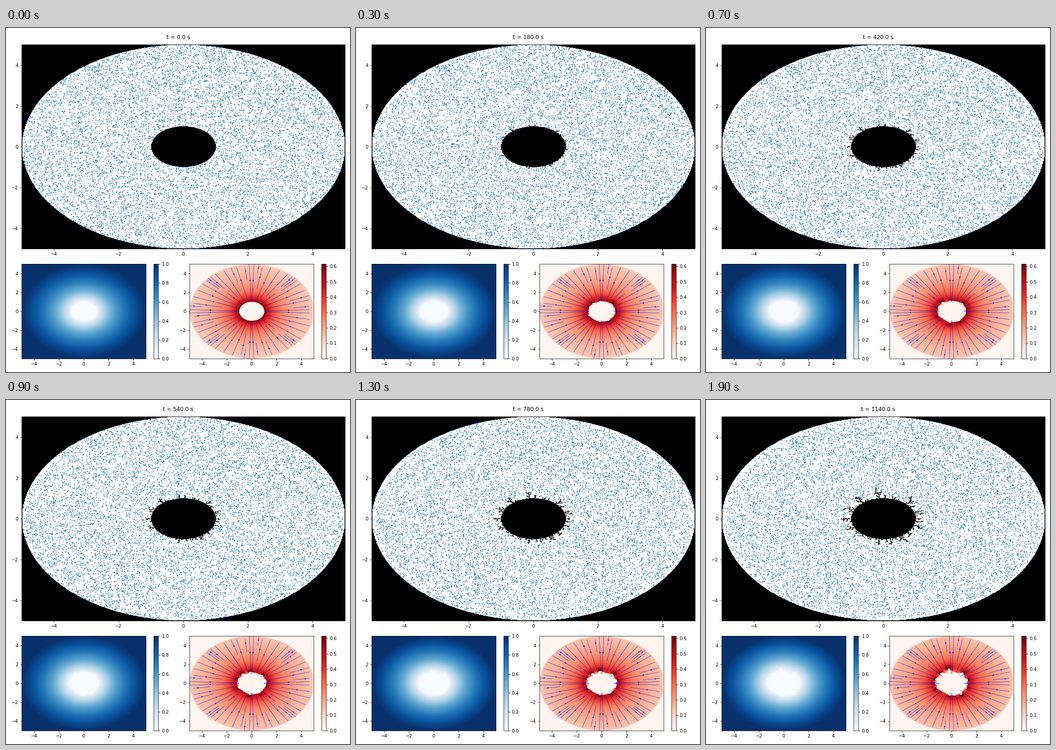
Write a matplotlib script that moves like this. It is 748 px wide and 748 px high and loops after 2 s.

```python
import numpy as np
import matplotlib.pyplot as plt
from matplotlib.animation import FuncAnimation

SIZE, DPI = 748, 72
FRAMES, INTERVAL = 20, 100
STEP_S = 60            # simulated seconds per frame
N = 400                # grid cells per side
IONS = 11500
R_IN, R_OUT = 1.0, 5.0
MOBILITY = 6.4e-4
SUBSTEPS = 12
JITTER = 0.024 / np.sqrt(SUBSTEPS)
E_MAX = 0.615
EXTENT = (-5, 5, -5, 5)

rng = np.random.default_rng(4)
axis = np.linspace(-5, 5, N)
h = axis[1] - axis[0]
X, Y = np.meshgrid(axis, axis)
R = np.hypot(X, Y)
outer = R >= R_OUT
parity = np.add.outer(np.arange(N), np.arange(N)) % 2 == 0


def grow(mask, diagonal=False):
    """Dilate a mask by one cell."""
    rows = mask.copy()
    rows[1:] |= mask[:-1]
    rows[:-1] |= mask[1:]
    base = rows if diagonal else mask
    out = rows.copy()
    out[:, 1:] |= base[:, :-1]
    out[:, :-1] |= base[:, 1:]
    return out


def relax(phi, free, rounds=70, omega=1.94):
    """Red-black over-relaxation of Laplace's equation."""
    core = phi[1:-1, 1:-1]
    weights = [omega * (free & p)[1:-1, 1:-1] for p in (parity, ~parity)]
    for _ in range(rounds):
        for w in weights:
            mean = 0.25 * (phi[2:, 1:-1] + phi[:-2, 1:-1]
                           + phi[1:-1, 2:] + phi[1:-1, :-2])
            core += w * (mean - core)


def field(phi):
    gy, gx = np.gradient(phi, h)
    return -gx, -gy


def strength(ex, ey, blocked):
    e = np.hypot(ex, ey)
    e[blocked | outer | (X > 4.9)] = 0
    return e


def cells(pos):
    idx = np.rint((pos + 5) / h).astype(int).clip(0, N - 1)
    return idx[:, 1], idx[:, 0]


def move(pos, solid, ex, ey):
    """Drift and diffuse the ions; those touching the electrode stick."""
    dt = STEP_S / SUBSTEPS
    for _ in range(SUBSTEPS):
        at = cells(pos)
        drift = MOBILITY * dt * np.column_stack((ex[at], ey[at]))
        new = pos + drift + rng.normal(0, JITTER, pos.shape)
        inside = np.hypot(new[:, 0], new[:, 1]) < R_OUT - 0.01
        pos = np.where(inside[:, None], new, pos)
        iy, ix = cells(pos)
        stuck = grow(solid)[iy, ix]
        solid[iy[stuck], ix[stuck]] = True
        pos = pos[~stuck]
    return pos


def simulate():
    core = R < R_IN
    solid = core.copy()
    radius = np.sqrt(rng.uniform(R_IN**2, R_OUT**2, IONS))
    angle = rng.uniform(0, 2 * np.pi, IONS)
    pos = np.column_stack((radius * np.cos(angle), radius * np.sin(angle)))
    phi = np.clip(np.log(np.maximum(R, R_IN)) / np.log(R_OUT), 0, 1)
    ex, ey = field(phi)
    states = [(pos, solid.copy(), phi.copy(), strength(ex, ey, core))]
    for _ in range(FRAMES - 1):
        pos = move(pos, solid, ex, ey)
        blocked = core | grow(grow(solid & ~core, diagonal=True))
        phi[blocked] = 0
        relax(phi, ~(blocked | outer))
        ex, ey = field(phi)
        states.append((pos, solid.copy(), phi.copy(),
                       strength(ex, ey, blocked)))
    return states


states = simulate()

fig = plt.figure(figsize=(SIZE / DPI + 1e-9,) * 2, dpi=DPI, facecolor="white")
title = fig.suptitle("", fontsize=12, x=374.4 / SIZE, y=733.8 / SIZE)


def panel(left, top, right, bottom):
    return fig.add_axes((left / SIZE, 1 - bottom / SIZE,
                         (right - left) / SIZE, (bottom - top) / SIZE))


def image(ax, data, cmap, vmax):
    im = ax.imshow(data, origin="lower", extent=EXTENT, aspect="auto",
                   cmap=cmap, vmin=0, vmax=vmax)
    ax.set(xlim=(-5, 5), ylim=(-5, 5),
           xticks=range(-4, 5, 2), yticks=range(-4, 5, 2))
    return im


main = panel(33.7, 36.4, 736.8, 480.3)
pot = panel(33.7, 513.4, 304.2, 718.8)
elec = panel(398.7, 513.4, 669.2, 718.8)

pos, solid, phi, e = states[0]
mask_im = image(main, solid | outer, "binary", 1)
dots = main.scatter(pos[:, 0], pos[:, 1], s=1)
pot_im = image(pot, phi, "Blues", 1)
elec_im = image(elec, e, "Reds", E_MAX)
fig.colorbar(pot_im, cax=panel(321.1, 513.4, 331.4, 718.8))
fig.colorbar(elec_im, cax=panel(686.1, 513.4, 696.4, 718.8),
             ticks=np.arange(0, 0.61, 0.1))

pull = np.where((e > 0) & (X < 4.68),
                1 / (np.maximum(R, R_IN)**2 * np.log(R_OUT)), 0)
elec.streamplot(axis, axis, -X * pull, -Y * pull, color="blue",
                linewidth=0.6, arrowsize=0.55)
elec.set(xlim=(-5, 5), ylim=(-5, 5))
main.set(xlim=(-5, 5), ylim=(-5, 5))


def draw(i):
    pos, solid, phi, e = states[i]
    title.set_text(f"t = {i * STEP_S:.1f} s")
    mask_im.set_data(solid | outer)
    dots.set_offsets(pos)
    pot_im.set_data(phi)
    elec_im.set_data(e)
    return title, mask_im, dots, pot_im, elec_im


anim = FuncAnimation(fig, draw, frames=FRAMES, interval=INTERVAL,
                     init_func=lambda: draw(0), repeat=True, repeat_delay=0)
plt.show()
```
